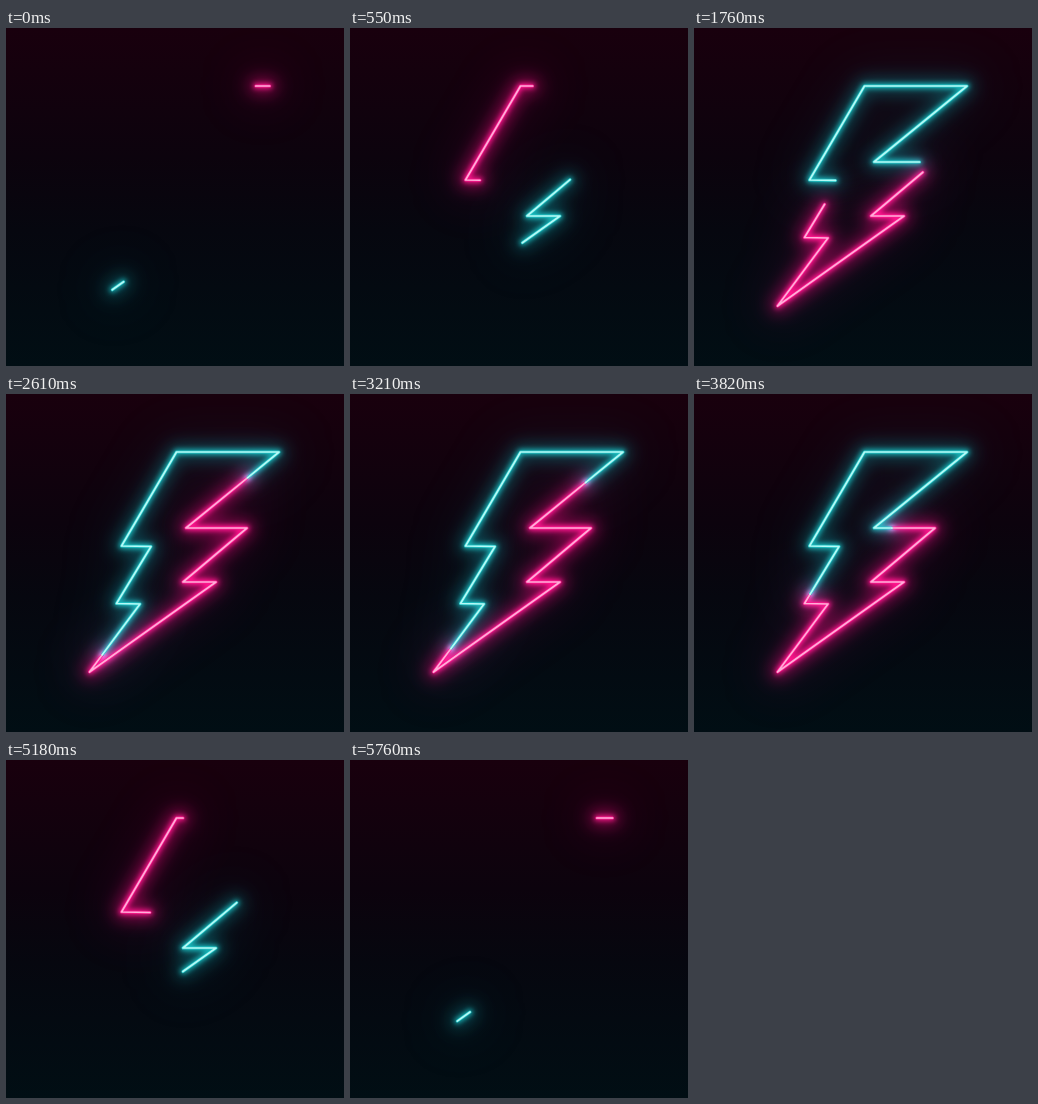
These frames come from a looping animation (338x338 px, 5820 ms). An HTML page with a canvas:

```html
<!DOCTYPE html>
<html>
<head>
<meta charset="utf-8">
<title>Neon bolt</title>
<style>
html, body { margin: 0; width: 100%; height: 100%; overflow: hidden; background: #07050c; }
canvas { display: block; background: linear-gradient(#19000d, #0c030d 38%, #06070f 60%, #010e14); }
</style>
</head>
<body>
<canvas id="stage" width="338" height="338"></canvas>
<script>
const ctx = document.getElementById('stage').getContext('2d');
const LOOP = 5820, TURN = 2885, LEAD = 62;

const points = [[170.5, 58], [273, 58], [180, 134], [241, 134], [177, 188], [210, 188],
  [83.5, 278], [134, 210], [110.5, 209.5], [145, 152.5], [115.5, 152]];
const bolt = new Path2D('M' + points.join('L') + 'Z');
const total = points.reduce((sum, [x, y], i) => {
  const [nx, ny] = points[(i + 1) % points.length];
  return sum + Math.hypot(nx - x, ny - y);
}, 0);
const half = total / 2;
const corner = 102.5; // distance along the outline to the top right tip

const strands = [
  { shift: 0, glow: '#ff0a88', line: '#ff1c90', core: '#ffbfe2' },
  { shift: half, glow: '#0c8a94', line: '#22cdce', core: '#c6fffb' }
];
const layers = [
  { color: 'glow', width: 40, blur: 24, alpha: 0.08 },
  { color: 'glow', width: 16, blur: 8, alpha: 0.42 },
  { color: 'line', width: 6, blur: 2.5, alpha: 0.6 },
  { color: 'line', width: 3, blur: 0, alpha: 0.9 },
  { color: 'core', width: 1.7, blur: 0, alpha: 0.9 }
];

function draw(now) {
  const t = now % LOOP;
  // Run out to the turning point, then back the same way, with a short rest.
  const time = Math.max(0, Math.min(t, 2 * TURN - t));
  const p = (time + LEAD) / (TURN + LEAD);
  const length = half * Math.min(1, 1.5 * p);
  const head = corner - half * p - length;

  ctx.clearRect(0, 0, 338, 338);
  ctx.lineJoin = 'round';
  ctx.lineCap = 'round';
  ctx.setLineDash([length, total - length]);
  for (const { color, width, blur, alpha } of layers) {
    ctx.globalCompositeOperation = blur ? 'lighter' : 'source-over';
    ctx.filter = blur ? `blur(${blur}px)` : 'none';
    ctx.globalAlpha = alpha;
    ctx.lineWidth = width;
    for (const strand of strands) {
      ctx.strokeStyle = strand[color];
      ctx.lineDashOffset = -(head + strand.shift);
      ctx.stroke(bolt);
    }
  }
  requestAnimationFrame(draw);
}
requestAnimationFrame(draw);
</script>
</body>
</html>
```
